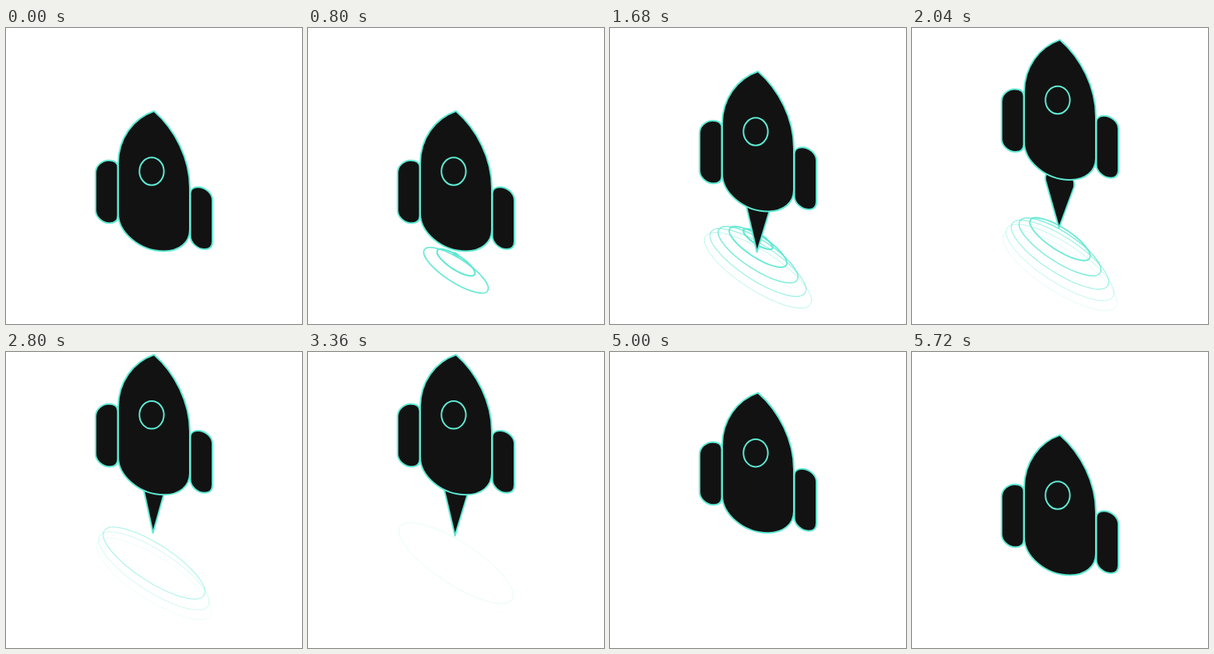
Recreate the animation shown at these times as an HTML page with a canvas. Size 380 by 380 pixels, loop 5.76 s.

```html
<!DOCTYPE html>
<html lang="en">
<head>
<meta charset="utf-8">
<title>Rocket</title>
<style>
  html, body { margin: 0; width: 100%; height: 100%; overflow: hidden; background: #fff; }
  canvas { display: block; width: 380px; height: 380px; }
</style>
</head>
<body>
<canvas id="stage"></canvas>
<script>
const SIZE = 380, LOOP = 5760;
const LINE = '#5fe8d2', FILL = '#121212';
const LIFT = 103.2;

const canvas = document.getElementById('stage');
const ctx = canvas.getContext('2d');
const dpr = window.devicePixelRatio || 1;
canvas.width = canvas.height = SIZE * dpr;

const body = new Path2D('M190 106.7C163 116 144 142 144 174V238C144 262 171 286.5 203 286.5C222 286.5 236 276 236 259V205C236 168 217 130 190 106.7Z');
const leftFin = new Path2D('M115 186C115 177 123 170 132 170C139 170 143.5 172 143.5 179V241C143.5 247 140 250.5 133 250.5C123 250.5 115 242 115 234Z');
const rightFin = new Path2D('M236.7 212C237 207 241 204.3 246 204.3C256 204.3 265 212 265 221V274C265 281 261 284 255 284C246 284 236.7 276 236.7 267Z');
const porthole = new Path2D();
porthole.ellipse(187, 184, 15.7, 17.7, 0, 0, Math.PI * 2);

const clamp = v => Math.min(1, Math.max(0, v));
const span = (t, start, length) => clamp((t - start) / length);

// Cubic bezier easing with y handles at 0 and 1
function bezier(x1, x2) {
  return x => {
    let lo = 0, hi = 1;
    for (let i = 0; i < 24; i++) {
      const s = (lo + hi) / 2, r = 1 - s;
      if (3 * x1 * s * r * r + 3 * x2 * s * s * r + s * s * s < x) lo = s;
      else hi = s;
    }
    return lo * lo * (3 - 2 * lo);
  };
}
const easeIn = bezier(0.42, 1);
const easeInOut = bezier(0.5, 0.5);

function height(t) {
  if (t < 3500) return LIFT * easeIn(span(t, 834, 1297));
  return LIFT * (1 - easeInOut(span(t, 4300, 1440)));
}

function shape(path) {
  ctx.fill(path);
  ctx.stroke(path);
}

function drawRing(i, t) {
  const u = (t - 112 - 324 * i) / 2520;
  if (u <= 0 || u >= 1) return;
  const a = 88 * (1 - Math.pow(1 - u, 2.5));
  ctx.globalAlpha = Math.min(1, 1.25 * (1 - u));
  ctx.lineWidth = 2.4 * (1 - u);
  ctx.beginPath();
  ctx.ellipse(190, 311 - 10 * i, a, a * 0.315, 33 * Math.PI / 180, 0, Math.PI * 2);
  ctx.stroke();
  ctx.globalAlpha = 1;
}

function drawFlame(t) {
  const out = span(t, 780, 130) * (1 - span(t, 4300, 200));
  if (!out) return;
  const pulse = 0.5 + 0.5 * Math.cos((t - 20) / 500 * Math.PI * 2);
  const dy = -13.5 * (1 - pulse) - 65 * (1 - out);
  const x = v => 188.7 + v * (0.75 + 0.25 * pulse);
  const y = v => v + dy;
  const p = new Path2D();
  p.moveTo(x(0), y(348.5));
  p.lineTo(x(-17.2), y(288));
  p.quadraticCurveTo(x(-19), y(280), x(-13.7), y(277));
  p.lineTo(x(14.3), y(283));
  p.quadraticCurveTo(x(21), y(286), x(19.4), y(296));
  p.closePath();
  shape(p);
}

function draw(t) {
  ctx.setTransform(dpr, 0, 0, dpr, 0, 0);
  ctx.fillStyle = '#fff';
  ctx.fillRect(0, 0, SIZE, SIZE);
  ctx.strokeStyle = LINE;
  ctx.fillStyle = FILL;
  ctx.lineJoin = 'round';
  for (let i = 0; i < 5; i++) drawRing(i, t);

  ctx.translate(0, -height(t));
  ctx.lineWidth = 2;
  drawFlame(t);
  shape(leftFin);
  shape(rightFin);
  shape(body);
  ctx.stroke(porthole);
}

const begin = performance.now();
function tick() {
  draw((performance.now() - begin) % LOOP);
  requestAnimationFrame(tick);
}
tick();
</script>
</body>
</html>
```
